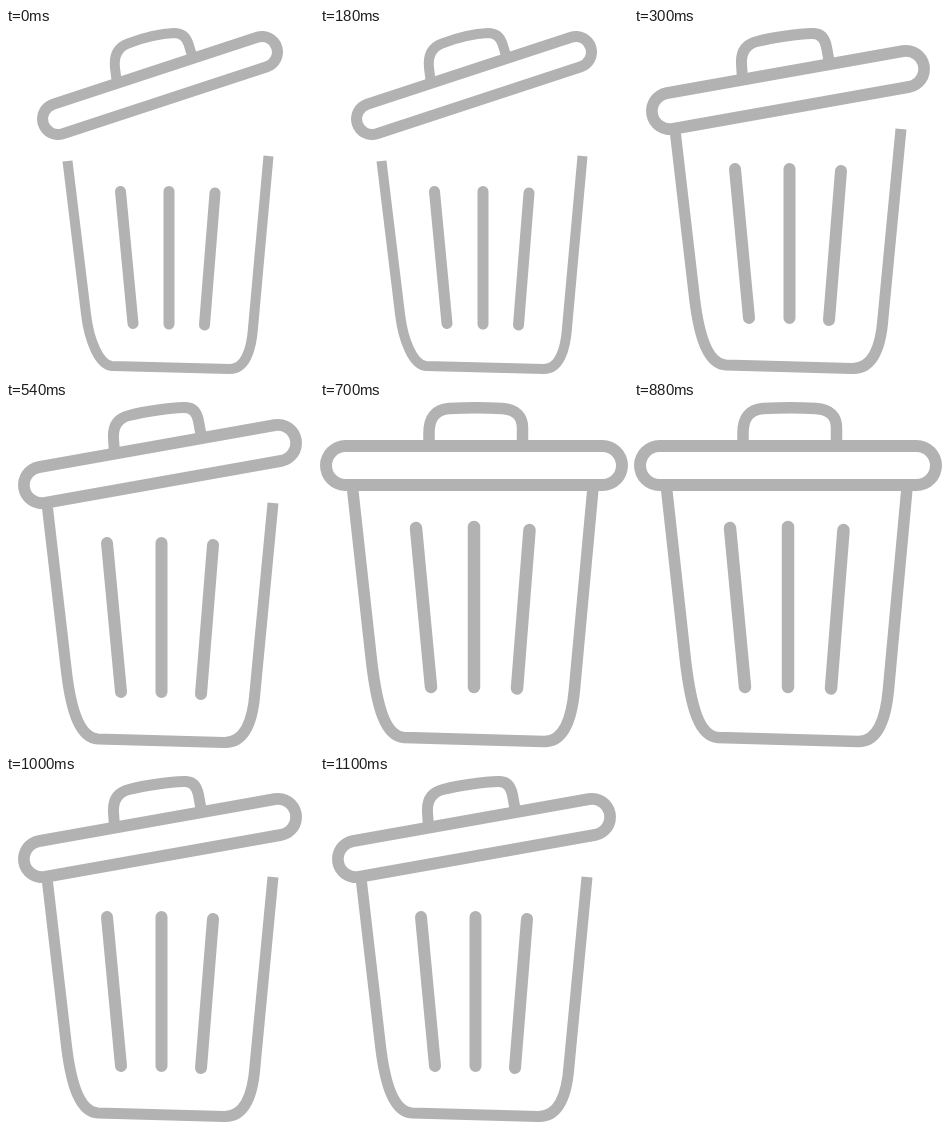
Animation, 308 px wide and 346 px high, one loop 1.3 s. Source, as an HTML page:

```html
<!DOCTYPE html>
<html lang="en">
<head>
<meta charset="utf-8">
<title>Trash can</title>
<style>
  html, body { margin: 0; width: 100%; height: 100%; overflow: hidden; background: #fff; }
  svg { display: block; width: 308px; height: 346px; }
  path { fill: none; stroke: #b2b2b2; }
  .round { stroke-linecap: round; }
  #hole { stroke: #fff; }
</style>
</head>
<body>
<svg viewBox="0 0 308 346">
  <path id="bin"/>
  <path id="slats" class="round"/>
  <path id="handle"/>
  <path id="lid" class="round"/>
  <path id="hole" class="round"/>
</svg>
<script>
// Each part is [path, stroke width]; the lid is a wide line with a white hole.
const open = {
  bin: ['M61.5 133L80 286C83 312 93 337 106 338L224 341C239 341 245.5 322 247 300L262.5 128', 10],
  slats: ['M114.5 163.5L127 295.5M163 163.5V296M209 165L198.5 297', 11],
  handle: ['M111 56L109 40Q107 21 122 15.5C139 9 154 5.5 168 5Q179 5 182.5 16L188 34', 10],
  lid: ['M52 91L256 24', 42],
  hole: ['M52 91L256 24', 20]
};
const tilted = {
  bin: ['M41.5 106L60.5 270C65.5 312 75 336 92 337L218 340.5C239 341 247 318 249 290L267 101', 11],
  slats: ['M101 141L115 290M155.5 141V290M207 143L195 292', 12],
  handle: ['M108.5 52L107.5 36Q106.5 17.5 123 13.5C140 9 165 6 178 5.5Q190 5 192.5 19L196 38', 11],
  lid: ['M36 83L272 41', 48],
  hole: ['M36 83L272 41', 24.5]
};
const closed = {
  bin: ['M32.5 86L51.5 259C57 305 65 334 84 335.5L224 339.5C244 340 252 315 254.5 287L273 86', 11.5],
  slats: ['M96 126L111 285M154 125V285M209.5 128L197 286.5', 12.5],
  handle: ['M109 42V31Q109 8 129 6.5C148 5.5 165 5.5 182 6.5Q202.5 8 202.5 26V42', 11.5],
  lid: ['M25.5 63.5H282.5', 51],
  hole: ['M25.5 63.5H282.5', 27]
};

const LOOP = 1300;
const start = performance.now();

function poseAt(t) {
  if (t < 300) return open;
  return t >= 700 && t < 1000 ? closed : tilted;
}

let shown;
function draw() {
  const pose = poseAt((performance.now() - start) % LOOP);
  if (pose !== shown) {
    for (const [id, [d, width]] of Object.entries(pose)) {
      const part = document.getElementById(id);
      part.setAttribute('d', d);
      part.setAttribute('stroke-width', width);
    }
    shown = pose;
  }
  requestAnimationFrame(draw);
}
draw();
</script>
</body>
</html>
```
